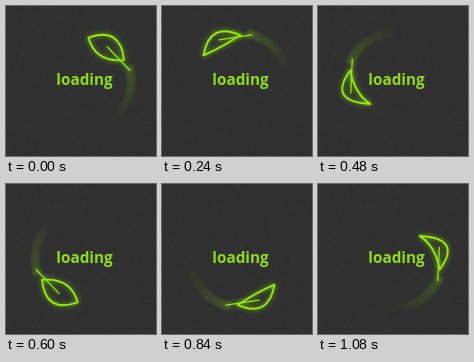
Write an HTML page with a canvas that moves like this. It is 150x150 px and loops after 1.2 s.

```html
<!DOCTYPE html>
<html lang="en">
<head>
<meta charset="utf-8">
<title>Loading</title>
<style>
  html, body { margin: 0; width: 100%; height: 100%; overflow: hidden; background: #313131; }
  canvas, svg { position: absolute; left: 0; top: 0; width: 150px; height: 150px; }
  text { font: bold 15.3px "Open Sans", "Noto Sans", sans-serif; fill: #8fdc1a; }
</style>
</head>
<body>
<canvas id="ground" width="150" height="150"></canvas>
<canvas id="stage" width="150" height="150"></canvas>
<svg viewBox="0 0 150 150"><text x="50.3" y="79">loading</text></svg>
<script>
const STEP = 120, STEPS = 10, TURN = 360 / STEPS;
const CENTER = [77, 75], RADIUS = 48, OUTER = 53, LEAF_ARC = 56;
const rad = deg => deg * Math.PI / 180;
const polar = (deg, r) => [
  CENTER[0] + r * Math.cos(rad(deg)),
  CENTER[1] + r * Math.sin(rad(deg))
];

function paintGround() {
  const c = document.getElementById('ground').getContext('2d');
  c.fillStyle = '#313131';
  c.fillRect(0, 0, 150, 150);
  let seed = 7;
  const rnd = () => (seed = seed * 16807 % 2147483647) / 2147483647;
  for (let i = 0; i < 5200; i++) {
    c.fillStyle = i % 2 ? 'rgba(255,255,255,.02)' : 'rgba(0,0,0,.06)';
    c.fillRect(rnd() * 150, rnd() * 150, 1 + rnd(), 1);
  }
}

const ctx = document.getElementById('stage').getContext('2d');

// The leaf circles once per loop while it flips twice about its own axis.
function poseAt(step) {
  const flip = lag => Math.cos(rad(2 * TURN * (step - lag)));
  const angle = -27 - TURN * step + 6 * (1 - flip(0));
  const middle = angle - LEAF_ARC / 2;
  const inner = 36.5 - 7 * flip(0.5);
  return {
    angle,
    base: polar(angle, 46),
    tip: polar(angle - LEAF_ARC, 41 + 9 * flip(1)),
    outer: polar(middle, OUTER),
    inner: polar(middle, inner),
    vein: polar(middle, (OUTER + inner) / 2),
    stem: polar(angle + 14, RADIUS)
  };
}

function drawTrail(start) {
  const parts = 38;
  ctx.save();
  ctx.filter = 'blur(1px)';
  ctx.lineWidth = 9;
  for (let i = 0; i < parts; i++) {
    const a = start + i * 2;
    ctx.strokeStyle = `rgba(125,190,35,${0.26 * (1 - i / parts)})`;
    ctx.beginPath();
    ctx.arc(...CENTER, RADIUS, rad(a), rad(a + 2));
    ctx.stroke();
  }
  ctx.restore();
}

// quadratic curve with the given halfway point
function curve(from, half, to) {
  const control = half.map((v, i) => 2 * v - (from[i] + to[i]) / 2);
  ctx.quadraticCurveTo(...control, ...to);
}

function drawLeaf({ base, tip, outer, inner, vein, stem }) {
  ctx.save();
  ctx.lineJoin = ctx.lineCap = 'round';
  ctx.strokeStyle = '#99e619';
  ctx.shadowColor = '#72c800';
  ctx.shadowBlur = 5;
  ctx.lineWidth = 1.9;
  ctx.beginPath();
  ctx.moveTo(...base);
  curve(base, outer, tip);
  curve(tip, inner, base);
  ctx.closePath();
  ctx.stroke();
  ctx.lineWidth = 1.3;
  ctx.beginPath();
  ctx.moveTo(...vein);
  ctx.lineTo(...stem);
  ctx.stroke();
  ctx.restore();
}

let shown = -1;
function tick() {
  const step = Math.floor(performance.now() / STEP) % STEPS;
  if (step !== shown) {
    shown = step;
    const pose = poseAt(step);
    ctx.clearRect(0, 0, 150, 150);
    drawTrail(pose.angle + 8);
    drawLeaf(pose);
  }
  requestAnimationFrame(tick);
}

paintGround();
tick();
</script>
</body>
</html>
```
